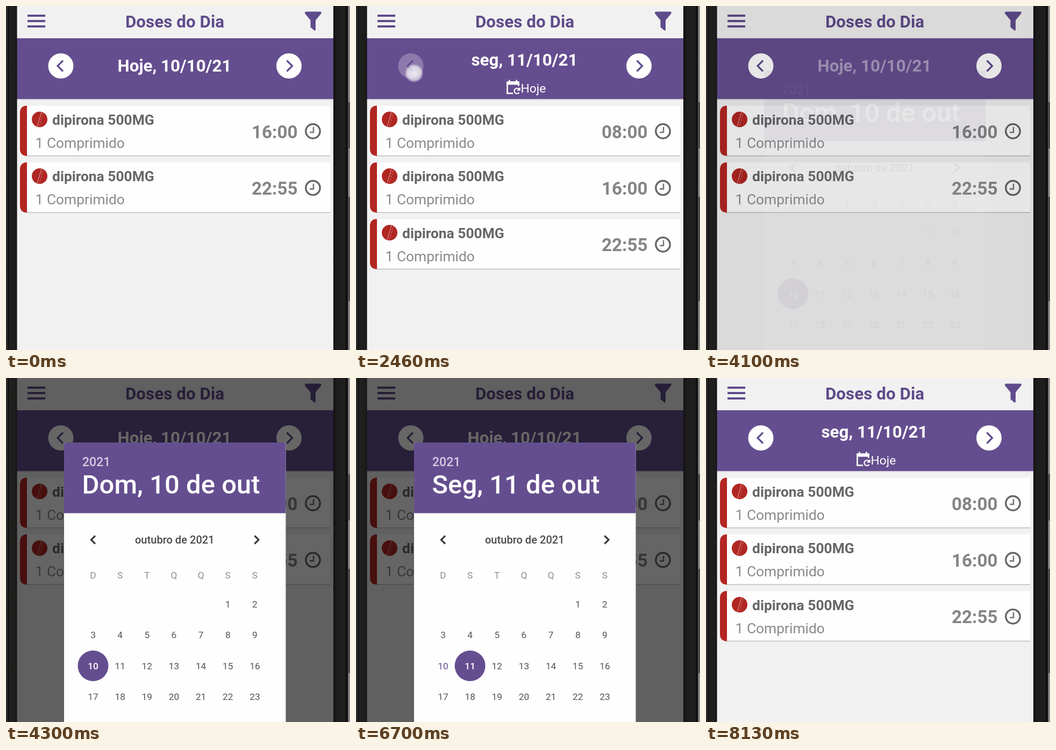
Recreate the animation shown at these times as an HTML page. Size 640x640 px, loop 8160 ms.

```html
<!DOCTYPE html>
<html lang="pt">
<head>
<meta charset="utf-8">
<title>Doses do Dia</title>
<style>
  html, body { margin: 0; width: 100%; height: 100%; overflow: hidden; background: #1c1c1c; }
  svg { display: block; width: 100%; height: 100%; font-family: Roboto, sans-serif; }
  .b { font-weight: 700; }
  .m { font-weight: 500; }
  .c { text-anchor: middle; }
  .line { fill: none; stroke-width: 3.2; }
</style>
</head>
<body>
<svg viewBox="0 0 640 640">
  <defs>
    <linearGradient id="left">
      <stop offset="0" stop-color="#2b2b2a"/><stop offset=".15" stop-color="#292928"/>
      <stop offset=".2" stop-color="#0c0c0c"/><stop offset=".32" stop-color="#20201f"/>
      <stop offset=".85" stop-color="#1d1d1c"/><stop offset="1" stop-color="#111"/>
    </linearGradient>
    <linearGradient id="right">
      <stop offset="0" stop-color="#111"/><stop offset=".2" stop-color="#1d1d1d"/>
      <stop offset=".7" stop-color="#1f1f1f"/><stop offset=".8" stop-color="#0c0c0c"/>
      <stop offset="1" stop-color="#2c2c2c"/>
    </linearGradient>
    <radialGradient id="glow">
      <stop offset="0" stop-color="#fff" stop-opacity=".85"/>
      <stop offset=".75" stop-color="#fff" stop-opacity=".65"/>
      <stop offset="1" stop-color="#fff" stop-opacity=".1"/>
    </radialGradient>
    <clipPath id="ball"><circle r="14.5"/></clipPath>
    <g id="card">
      <path d="M38 186H603V279.500H38Z" fill="#bdbdbd"/>
      <path d="M38 185.500H603V278H38Z" fill="#fefefe"/>
      <path d="M39 185.500H38Q26 186 26 199V266Q26 278 38 279H39Z" fill="#b32622"/>
      <g transform="translate(62.500 211)">
        <circle r="14.500" fill="#b02622"/>
        <g clip-path="url(#ball)" stroke="#d98a86" stroke-width="1.200">
          <path d="M4 -15L-5 15"/><path d="M8 -15L-1 15" stroke-opacity=".7" stroke-dasharray="3 2"/>
        </g>
      </g>
      <text class="b" x="86" y="221" font-size="26.400" fill="#666">dipirona 500MG</text>
      <text x="54.500" y="264" font-size="26.400" fill="#8a8a8a">1 Comprimido</text>
      <circle cx="571" cy="233" r="13.200" fill="none" stroke="#666" stroke-width="3.400"/>
      <path d="M572 225V235H565" fill="none" stroke="#777" stroke-width="2.600"/>
    </g>
  </defs>

  <rect x="20" width="590" height="640" fill="#f1f1f1"/>
  <rect x="20" y="173" width="590" height="2" fill="#d9d6df"/>
  <rect x="20" y="60" width="590" height="113" fill="#654e8f"/>
  <path d="M40 18H73M40 28H73M40 38H73" stroke="#5f4b8b" stroke-width="4"/>
  <text class="b c" x="314" y="40" font-size="31.400" fill="#5f4b8b">Doses do Dia</text>
  <path d="M558 10.500H585Q588 11 586 14.500L576 26.500V44.500Q575 46.500 573 45L566.500 39.500V26.500L556.500 14.500Q555 11 558 10.500Z" fill="#5f4b8b"/>

  <g id="prev">
    <circle cx="102" cy="111.500" r="23.500" fill="#fff"/>
    <path class="line" d="M106 101.500L96 111.500L106 121.500" stroke="#5f4b8b"/>
  </g>
  <g id="next">
    <circle cx="526.500" cy="111.500" r="23.500" fill="#fff"/>
    <path class="line" d="M522.500 101.500L532.500 111.500L522.500 121.500" stroke="#5f4b8b"/>
  </g>
  <text id="date" class="b c" x="313.500" font-size="31.400" fill="#fff"></text>
  <g id="back" fill="none" stroke="#fff" stroke-width="2.600">
    <path d="M292 162.500H281.500V141.500H302.500V149"/>
    <path d="M280.500 143.500H303.500" stroke-width="6"/>
    <path d="M285.500 137.500V142M298.500 137.500V142"/>
    <path d="M303.500 155A5 5 0 1 0 303.500 161M304.500 152V156.500H299.500" stroke-width="2.200"/>
    <text x="306.500" y="161" font-size="22.800" fill="#fff" stroke="none">Hoje</text>
  </g>

  <g id="list"></g>
  <rect id="dim" x="20" width="590" height="640"/>

  <g id="dialog">
    <rect x="108" y="120" width="412.500" height="540" rx="4" fill="#fefefe"/>
    <path d="M108 251.500V124Q108 120 112 120H516.500Q520.500 120 520.500 124V251.500Z" fill="#654e8f"/>
    <text class="m" x="142" y="164" font-size="23" fill="#d5cde2">2021</text>
    <text id="chosen" class="m" x="141.500" y="215" font-size="49" fill="#fff"></text>
    <path class="line" d="M166 293.500L158.500 301L166 308.500M462.500 293.500L470 301L462.500 308.500" stroke="#3c3c3c"/>
    <text class="m c" x="313.800" y="307.500" font-size="20.100" fill="#4a4a4a">outubro de 2021</text>
    <circle id="pick" cy="535.500" r="28.500" fill="#654e8f"/>
    <g id="days" class="c" font-size="17.300"></g>
  </g>

  <circle id="dot" r="17" fill="url(#glow)"/>
  <rect width="20.500" height="640" fill="url(#left)"/>
  <rect x="609" width="31" height="640" fill="url(#right)"/>
  <rect x="636.500" width="3.500" height="640" fill="#8a8a8a"/>
  <path d="M636.500 179H640V265H636.500ZM636.500 355H640V549H636.500Z" fill="#4a4a4a"/>
</svg>
<script>
const LOOP = 8160;
const $ = id => document.getElementById(id);
const set = (el, attrs) => { for (const k in attrs) el.setAttribute(k, attrs[k]); };
const add = (parent, tag, attrs, text = '') => {
  const el = document.createElementNS('http://www.w3.org/2000/svg', tag);
  set(el, attrs);
  el.textContent = text;
  return parent.appendChild(el);
};
const ramp = (t, from, to) => Math.min(1, Math.max(0, (t - from) / (to - from)));
const ease = p => p * p * (3 - 2 * p);

// Touches: place, press and release times, peak strength
const taps = [
  { x: 530, y: 124, down: 960, up: 1080, power: 1 },
  { x: 108, y: 125, down: 2330, up: 2470, power: 1 },
  { x: 313, y: 110, down: 3880, up: 3990, power: 1 },
  { x: 212, y: 536, down: 5230, up: 5330, power: 1 }
];
const touchAlpha = (t, { down, up }) => ramp(t, down - 30, down) * (1 - ramp(t, up, up + 50));
const pressAlpha = (t, { down, up }) =>
  1 - 0.75 * ease(ramp(t, down, down + 100)) * (1 - ease(ramp(t, up + 45, up + 245)));

const rows = [0, 1, 2].map(i => {
  const g = add($('list'), 'g', { transform: `translate(0 ${i * 105.4})` });
  add(g, 'use', { href: '#card' });
  const time = add(g, 'text', {
    class: 'b', x: 542.5, y: 245.5, 'font-size': 33.2, fill: '#858585', 'text-anchor': 'end'
  });
  return { g, time };
});

const colX = i => 162 + 50.15 * i;
[...'DSTQQSS'].forEach((s, i) => add($('days'), 'text', { x: colX(i), y: 373, fill: '#8c8c8c' }, s));
const days = [];
for (let d = 1; d <= 23; d++) {
  const cell = d + 4;
  days[d] = add($('days'), 'text', { x: colX(cell % 7), y: 427 + 57.3 * Math.floor(cell / 7) }, d);
}

function draw(t) {
  const monday = (t >= 1110 && t < 2540) || t >= 6880;
  $('date').textContent = monday ? 'seg, 11/10/21' : 'Hoje, 10/10/21';
  set($('date'), { y: monday ? 110.5 : 122, opacity: pressAlpha(t, taps[2]) });
  set($('back'), { opacity: +monday });
  set($('next'), { opacity: pressAlpha(t, taps[0]) });
  set($('prev'), { opacity: pressAlpha(t, taps[1]) });

  const times = monday ? ['08:00', '16:00', '22:55'] : ['16:00', '22:55'];
  rows.forEach(({ g, time }, i) => {
    set(g, { opacity: i < times.length ? 1 : 0 });
    time.textContent = times[i] || '';
  });

  set($('dim'), { opacity: 0.6 * ramp(t, 4070, 4270) * (1 - ramp(t, 6710, 6838)) });
  set($('dialog'), { opacity: ramp(t, 4090, 4270) * (1 - ramp(t, 6710, 6812)) });

  const picked = t < 5340 ? 10 : 11;
  $('chosen').textContent = picked === 10 ? 'Dom, 10 de out' : 'Seg, 11 de out';
  set($('pick'), { cx: colX(picked - 10) });
  days.forEach((el, d) => {
    const chosen = d === picked;
    set(el, { fill: chosen ? '#fff' : d === 10 ? '#654e8f' : '#555', 'font-weight': chosen ? 500 : 400 });
  });

  const tap = taps.find(p => t > p.down - 40 && t < p.up + 60);
  set($('dot'), tap ? { cx: tap.x, cy: tap.y, opacity: tap.power * touchAlpha(t, tap) } : { opacity: 0 });
}

const start = performance.now();
function tick() {
  draw((performance.now() - start) % LOOP);
  requestAnimationFrame(tick);
}
tick();
</script>
</body>
</html>
```
